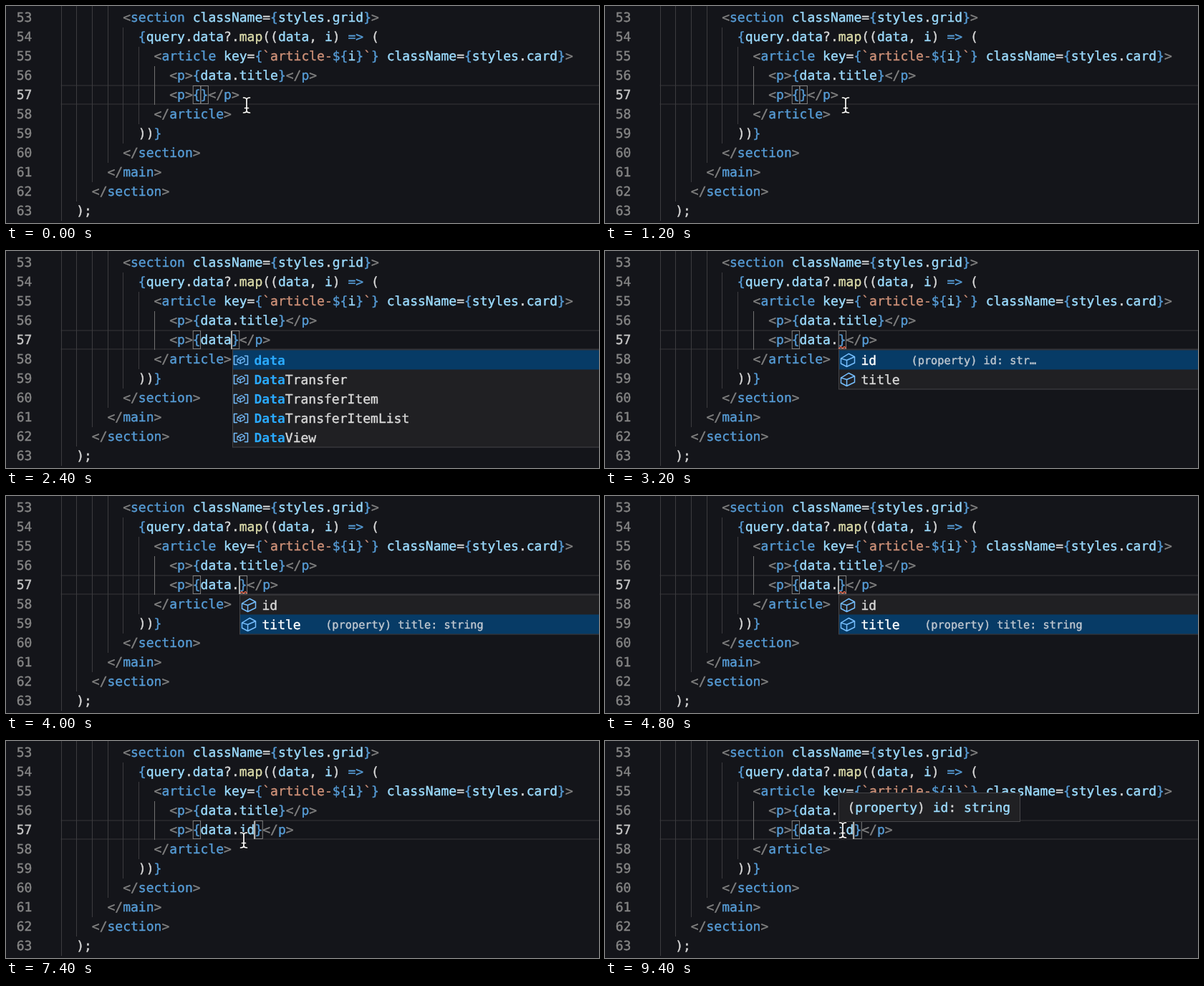
Write an HTML page that moves like this. It is 828x303 px and loops after 9600 ms.

```html
<!DOCTYPE html>
<html lang="en">
<head>
<meta charset="utf-8">
<title>Code completion</title>
<style>
html, body { margin: 0; width: 100%; height: 100%; overflow: hidden; background: #14151a; }
svg { display: block; width: 828px; height: 303px; }
text { font: 18px "DejaVu Sans Mono", monospace; white-space: pre; text-rendering: geometricPrecision; stroke-width: .4px; }
.small { font-size: 15.27px; }
.bold { font-weight: bold; stroke-width: 0; }
</style>
</head>
<body>
<svg id="stage" viewBox="0 0 828 303" xmlns="http://www.w3.org/2000/svg">
  <g id="code"></g>
  <g id="live"></g>
</svg>
<script>
const LOOP = 9600, STEP = 200;
const CW = 10.837, LH = 27, X0 = 76.5, BASE = 22;
const COLORS = {
  g: '#808080', b: '#569cd6', a: '#9cdcfe', w: '#d8d8d8', s: '#ce9178', f: '#dcdcaa',
  n: '#858585', c: '#c6c6c6', h: '#2aaaff', W: '#ffffff', d: '#a4a4a6', D: '#c0c8d0'
};
const col = c => X0 + c * CW;

function rect(x, y, w, h, fill, stroke = 'none') {
  return `<rect x="${x}" y="${y}" width="${w}" height="${h}" fill="${fill}" stroke="${stroke}"/>`;
}
function path(d, stroke, width = 1.5) {
  return `<path d="${d}" fill="none" stroke="${stroke}" stroke-width="${width}" stroke-linejoin="round" stroke-linecap="round"/>`;
}
function text(x, y, key, str, cls = '') {
  const safe = str.replace(/&/g, '&amp;').replace(/</g, '&lt;');
  const color = COLORS[key];
  return `<text x="${x}" y="${y}" fill="${color}" stroke="${color}" class="${cls}" xml:space="preserve">${safe}</text>`;
}
// Each token is a colour key followed by its text.
function tokens(x, y, list) {
  let out = '';
  for (const token of list) {
    const str = token.slice(1);
    out += text(x, y, token[0], str);
    x += str.length * CW;
  }
  return out;
}
const closing = tag => ['g</', 'b' + tag, 'g>'];

// Indent and tokens of lines 53 to 63; line 57 is drawn live.
const LINES = [
  [8, ['g<', 'bsection', 'a className', 'w=', 'b{', 'astyles', 'w.', 'agrid', 'b}', 'g>']],
  [10, ['b{', 'aquery', 'w.', 'adata', 'w?.', 'fmap', 'w((', 'adata', 'w, ', 'ai', 'w) ', 'b=>', 'w (']],
  [12, ['g<', 'barticle', 'a key', 'w=', 'b{', 's`article-', 'b${', 'ai', 'b}', 's`', 'b}',
    'a className', 'w=', 'b{', 'astyles', 'w.', 'acard', 'b}', 'g>']],
  [14, ['g<', 'bp', 'g>', 'b{', 'adata', 'w.', 'atitle', 'b}', ...closing('p')]],
  [14, []],
  [12, closing('article')],
  [10, ['w))', 'b}']],
  [8, closing('section')],
  [6, closing('main')],
  [4, closing('section')],
  [2, ['w);']]
];

function drawCode() {
  let out = rect(X0, 110, 752, 2, '#252529') + rect(X0, 136, 752, 2, '#252529');
  LINES.forEach(([indent, list], i) => {
    const top = 3 + i * LH;
    for (let c = 0; c < indent; c += 2) {
      const y = i ? top : 0;
      out += rect(Math.round(col(c)), y, 1, top + LH - y, c === 12 ? '#707070' : '#3c3c3f');
    }
    out += text(14.7, BASE + i * LH, i === 4 ? 'c' : 'n', String(53 + i));
    out += tokens(col(indent), BASE + i * LH, list);
  });
  return out;
}

const WORDS = [[0, ''], [1400, 'd'], [1600, 'da'], [2000, 'dat'], [2200, 'data'], [2600, 'data.'], [6000, 'data.id']];
const wordAt = t => WORDS.filter(w => w[0] <= t).pop();

const SOURCES = ['zod', 'zod/lib', 'zod/lib/types', 'zod/lib/external'];
const DATES = [['data', ''], ...SOURCES.map(s => ['date', s]), ['DataTransfer', '']];
const DATAS = ['data', 'DataTransfer', 'DataTransferItem', 'DataTransferItemList', 'DataView'].map(s => [s, '']);
const FIELDS = [['id', '(property) id: str…'], ['title', '(property) title: string']];

function cube(x, y, r, width) {
  const h = r * .5;
  return path(`M${x - r} ${y - h * .5}L${x + r * .15} ${y - r * .95}L${x + r} ${y - h}V${y + h * .8}` +
    `L${x - r * .15} ${y + r * .95}L${x - r} ${y + h}ZM${x - r} ${y - h * .5}L${x - r * .15} ${y}` +
    `L${x + r} ${y - h}M${x - r * .15} ${y}V${y + r * .95}`, '#75beff', width);
}
function variableIcon(x, y) {
  return path(`M${x + 5} ${y - 6}H${x + 1}V${y + 6}H${x + 5}M${x + 16} ${y - 6}H${x + 20}V${y + 6}H${x + 16}`, '#75beff') +
    cube(x + 10.5, y, 5, 1.3);
}

function popup(x, rows, selected, typed, fields) {
  let out = rect(x + .5, 138, 840 - x, rows.length * LH + 1, '#202023', '#454548');
  out += rect(x + 1, 138.5 + selected * LH, 840 - x, LH, '#073b66');
  rows.forEach(([label, note], i) => {
    const y = 152.5 + i * LH, base = y + 6, lx = x + (fields ? 31.5 : 30.5);
    out += fields ? cube(x + 13, y, 9.5, 1.5) : variableIcon(x + 1.5, y);
    out += text(lx, base, 'h', label.slice(0, typed), 'bold');
    out += text(lx + typed * CW, base, i === selected ? 'W' : 'w', label.slice(typed));
    if (fields && i !== selected) return;
    const nx = fields && !i ? 427.5 : lx + label.length * CW + 34.5;
    out += text(nx, base - .5, fields ? 'D' : 'd', note, 'small');
  });
  return out;
}

function bracketBox(x) {
  return rect(x + .5, 111.5, CW - .5, 25, 'none', '#808080');
}

function pointer(x, y) {
  const d = `M${x - 4.5} ${y - 10.5}Q${x} ${y - 10.5} ${x} ${y - 7.5}Q${x} ${y - 10.5} ${x + 4.5} ${y - 10.5}` +
    `M${x} ${y - 7.5}V${y + 7.5}M${x - 4.5} ${y + 10.5}Q${x} ${y + 10.5} ${x} ${y + 7.5}` +
    `Q${x} ${y + 10.5} ${x + 4.5} ${y + 10.5}M${x - 2.5} ${y + 4}H${x + 2.5}`;
  return path(d, '#111', 3.4) + path(d, '#fff', 1.7);
}

function hover() {
  return rect(326.5, 72.5, 253, 40, '#202023', '#454548') +
    tokens(338.5, 98.5, ['w(', 'aproperty', 'w) ', 'aid', 'w: ', 'astring']);
}

const mix = (a, b, t, from, to) => {
  const k = Math.min(1, Math.max(0, (t - from) / (to - from)));
  return a + (b - a) * k * k * (3 - 2 * k);
};

function draw(t) {
  const [typedAt, word] = wordAt(t);
  const end = col(18 + word.length), y = BASE + 4 * LH;
  const parts = word.split('.');
  const list = ['g<', 'bp', 'g>', 'b{', 'a' + parts[0]];
  if (parts.length > 1) list.push('w.', 'a' + parts[1]);
  list.push('b}', ...closing('p'));

  let out = bracketBox(col(17)) + bracketBox(end) + tokens(col(14), y, list);

  if (t >= 2800 && t < 6400) {
    out += path(`M${end + 1} 136l2.5 -2.5l2.5 2.5l2.5 -2.5l2 2`, '#e4694f', 1.4);
  }
  const since = t - (typedAt || 400);
  if (since >= 0 && since % 1000 < 500) out += rect(Math.round(end) - 1, 111.5, 2, 25.5, '#aeafad');

  if (t >= 1400 && t < 2600) {
    out += popup(Math.round(end) + 1, word === 'data' ? DATAS : DATES, 0, word.length, false);
  } else if (t >= 2800 && t < 6000) {
    out += popup(326, FIELDS, t >= 4000 && t < 5200 ? 1 : 0, 0, true);
  }
  if (t >= 8200) out += hover();
  if (t < 1400) out += pointer(336, 138.5);
  else if (t >= 7000) out += pointer(mix(336, 332, t, 7000, 7400), mix(138.5, 124.5, t, 7400, 7800));
  return out;
}

document.getElementById('code').innerHTML = drawCode();
const live = document.getElementById('live');
const start = performance.now();
let last = -1;
function tick() {
  const t = Math.floor((performance.now() - start) % LOOP / STEP) * STEP;
  if (t !== last) live.innerHTML = draw(last = t);
  requestAnimationFrame(tick);
}
tick();
</script>
</body>
</html>
```
